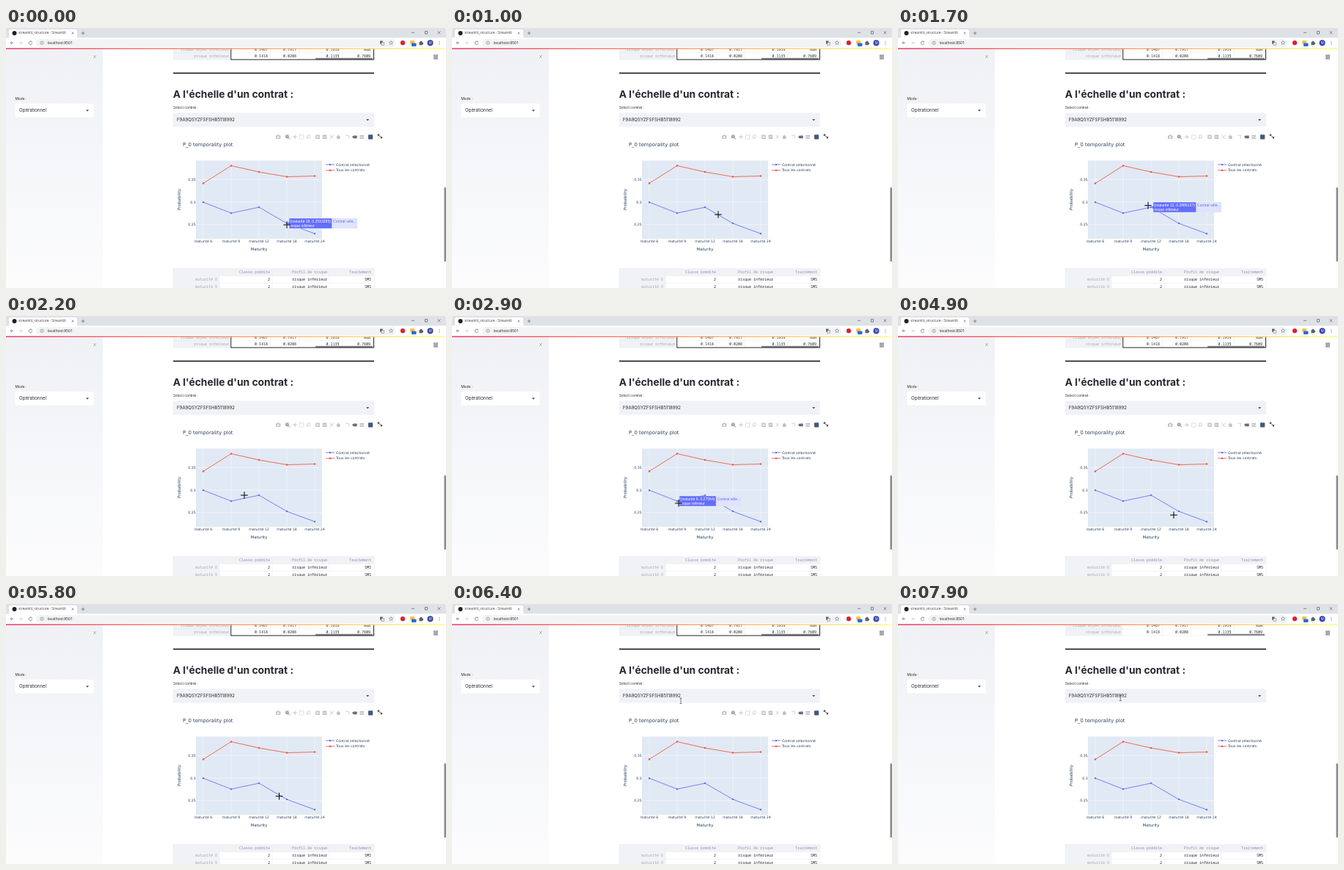
Write an HTML page that moves like this. It is 600x354 px and loops after 8000 ms.

```html
<!DOCTYPE html>
<html lang="fr">
<head>
<meta charset="utf-8">
<title>Streamlit</title>
<style>
html, body { margin: 0; width: 100%; height: 100%; overflow: hidden; background: #fff }
svg { display: block; width: 600px; height: 354px }
text { white-space: pre }
</style>
</head>
<body>
<svg id="stage" viewBox="0 0 600 354"></svg>
<script>
const UI = 'Inter, sans-serif', CHROME = 'Open Sans, sans-serif', PLOT = 'DejaVu Sans, sans-serif',
      MONO = 'Noto Sans Mono, monospace', ARIAL = 'Liberation Sans, sans-serif';
const INK = '#262730', PALE = '#f0f2f6', NAVY = '#2a3f5f', BLUE = '#636efa', RED = '#ef553b', GREY = '#a3a8b4';

const rect = (x, y, w, h, fill, more = '') => `<rect x="${x}" y="${y}" width="${w}" height="${h}" fill="${fill}" ${more}/>`;
const dot = (x, y, r, fill) => `<circle cx="${x}" cy="${y}" r="${r}" fill="${fill}"/>`;
const ring = (x, y, r, color, w) => `<circle cx="${x}" cy="${y}" r="${r}" fill="none" stroke="${color}" stroke-width="${w}"/>`;
const path = (d, color, w = .7, fill = 'none') => `<path d="${d}" fill="${fill}" stroke="${color}" stroke-width="${w}"/>`;
const hline = (x, y, w, color, width) => path(`M${x} ${y}h${w}`, color, width);
const vline = (x, y, h, color, width) => path(`M${x} ${y}v${h}`, color, width);
// y is the vertical middle of the text
const text = (x, y, s, size, font, fill = INK, anchor = 'start', more = '') =>
  `<text x="${x}" y="${y + size * .36}" font-size="${size}" font-family="${font}" fill="${fill}" text-anchor="${anchor}" ${more}>${s}</text>`;
const mono = (x, y, s, fill = INK) => text(x, y, s, 5, MONO, fill, 'end');
const cross = (x, y, r, color, w) => path(`M${x - r} ${y - r}l${2 * r} ${2 * r}m0 ${-2 * r}l${-2 * r} ${2 * r}`, color, w);
const plus = (x, y, r, color, w) => hline(x - r, y, 2 * r, color, w) + vline(x, y - r, 2 * r, color, w);
const caret = (x, y) => `<path d="M${x - 2} ${y - 1}h4l-2 2z" fill="${INK}"/>`;
const arrow = (x, y, dir, color) => path(`M${x - 2 * dir} ${y}h${4 * dir}m${-2 * dir} -2l${2 * dir} 2l${-2 * dir} 2`, color);

function browser() {
  const c = '#5f6368', y = 20.2;
  const star = [...Array(10).keys()].map(k => {
    const r = k % 2 ? 1.3 : 2.8, a = k * Math.PI / 5;
    return (525 + r * Math.sin(a)) + ' ' + (y - r * Math.cos(a));
  });
  return rect(0, 0, 600, 13.5, '#dee1e6') + rect(4, 2, 93, 14, '#fff', 'rx="2.5"') +
    dot(11.5, 7, 3, '#222') +
    text(17, 6.8, 'streamlit_structure - Streamlit', 4.7, CHROME, '#3c4043') +
    cross(91, 7, 1.4, c, .6) + plus(105, 7, 2.2, c, .7) +
    hline(553, 6.3, 4, '#222', .5) + path('M571.5 4.5h3v3.5h-3z', '#222', .5) + cross(590.5, 6.3, 1.9, '#222', .5) +
    rect(0, 13.5, 600, 14, '#fff') + rect(41, 15, 490, 11, '#f1f3f4', 'rx="5.5"') +
    arrow(8, y, -1, c) + arrow(20, y, 1, '#babcbe') +
    path('M35.6 19.2a2.3 2.3 0 1 0 0 2.2', c) + hline(34.4, 19, 1.6, c) +
    vline(49, 19.2, 2.2, c, .5) + ring(49, y, 2.2, c, .5) +
    text(56.5, y, 'localhost:8501', 5.1, CHROME, '#202124') +
    rect(510, 17.5, 3.6, 4, c) + rect(512, 19.4, 3.5, 3.8, '#f1f3f4', `stroke="${c}" stroke-width=".5"`) +
    path(`M${star.join('L')}z`, c, .5) +
    dot(541, y, 3.1, '#d9232e') +
    rect(551, 17, 6, 5, '#f4c63d', 'rx="1"') + rect(553, 20.5, 6.5, 4.5, '#2f68d8', 'rx="1"') +
    rect(563.5, 18.7, 4.6, 4.6, c) + dot(566, 18.5, 1.1, c) + dot(568.2, 21, 1.1, c) +
    dot(578.5, y, 4, '#3442a8') + text(578.5, y, 'M', 4.6, CHROME, '#fff', 'middle') +
    [-2, 0, 2].map(d => dot(591, y + d, .55, c)).join('') +
    rect(0, 27.3, 600, 1.5, 'url(#strip)');
}

function sidebar() {
  return rect(0, 28, 132, 326, 'url(#side)') + cross(121, 39, 2, GREY, .8) +
    text(12.5, 96.2, 'Mode :', 4.8, UI) + rect(12.5, 103, 107, 18.5, '#fff', 'rx="1.5"') +
    text(18, 112.3, 'Opérationnel', 6.1, UI) + caret(111, 112.5);
}

const row = (y, nameX, name, cols, vals, fill) => mono(nameX, y, name, GREY) +
  vals.split('|').map((v, i) => mono(cols[i], y, v, fill)).join('');

function tables() {
  const line = '#e6e8ec', upper = [357, 396, 454.5, 497], lower = [360, 438, 498];
  return rect(228, 27, 78.5, 16, PALE) +
    [33.7, 43.2, 327.5, 337.5, 347.3].map(y => hline(228, y, 274, line, .5)).join('') +
    [360.5, 399.5, 458].map(x => vline(x, 27, 16, line, .5)).join('') +
    row(28.8, 304, 'risque moyen inférieur', upper, '0.1467|0.7917|0.1959|NaN') +
    row(38.5, 304, 'risque inférieur', upper, '0.1418|0.0208|0.1135|0.7609') +
    rect(422, 40.8, 78, 2.2, '#858587', 'rx=".8"') +
    rect(228, 327.5, 274, 10, PALE) + rect(228, 337, 63, 17, PALE) +
    [228, 291, 363, 441, 502].map(x => vline(x, 327.5, 27, line, .5)).join('') +
    row(332.6, 288, '', lower, 'Classe prédite|Profil de risque|Traitement', '#8b909d') +
    row(342.4, 288, 'maturité 6', lower, '2|risque inférieur|SMS') +
    row(352, 288, 'maturité 9', lower, '2|risque inférieur|SMS');
}

function heading() {
  return rect(228, 60.7, 274, 1.5, '#111') +
    text(227.8, 89.6, "A l'échelle d'un contrat :", 13.8, UI, INK, 'start', 'font-weight="700"') +
    text(228, 108.7, 'Select contrat :', 4.75, UI) + rect(228, 115.5, 274, 19, PALE, 'rx="1.5"') +
    text(233, 125.2, 'F9A9QSYZFSFSHB5118992', 6.1, UI) + caret(493.2, 125.3) +
    [-2.3, 0, 2.3].map(d => hline(583, 39.5 + d, 6, INK, .9)).join('') +
    rect(597.5, 217, 2.5, 101, '#8a8b8f', 'rx="1"');
}

const months = [6, 9, 12, 18, 24], X = i => 269 + 38 * i;
const chosen = [237.2, 252, 244, 266, 280], all = [211.5, 187.5, 196, 202.5, 201.5];
const values = [.3, .27564, .2886137, .2533285, .23];

function chart() {
  const series = (ys, c) => path('M' + ys.map((y, i) => X(i) + ' ' + y).join('L'), c, .85) +
    ys.map((y, i) => dot(X(i), y, 1.2, c)).join('');
  const key = (y, c, s) => hline(436, y, 12, c, .85) + dot(442, y, 1.2, c) + text(450, y, s, 4.69, PLOT, NAVY);
  return text(241, 158.3, 'P_0 temporality plot', 6.8, PLOT, NAVY) +
    rect(259, 180.5, 172, 106.5, '#e1e9f4') +
    months.map((m, i) => vline(X(i), 180.5, 106.5, '#fff', .5) +
      text(X(i), 290.3, 'maturité ' + m, 4.69, PLOT, NAVY, 'middle')).join('') +
    [.35, .3, .25].map((v, i) => hline(259, 206.3 + 30.7 * i, 172, '#fff', .5) +
      text(258.8, 206.3 + 30.7 * i, v, 4.69, PLOT, NAVY, 'end')).join('') +
    series(chosen, BLUE) + series(all, RED) +
    key(186, BLUE, 'Contrat sélectionné') + key(193.8, RED, 'Tous les contrats') +
    text(345, 301, 'Maturity', 5.47, PLOT, NAVY, 'middle') +
    text(0, 0, 'Probability', 5.47, PLOT, NAVY, 'middle', 'transform="translate(236.5 233.5) rotate(-90)"');
}

function modebar() {
  const c = '#bfc1c5', d = '#6b6d72', y = 148.3;
  const box = x => rect(x - 2.8, y - 2.8, 5.6, 5.6, c, 'rx=".6"') + hline(x - 2, y, 4, '#fff', .8);
  return rect(368, 146.2, 6.5, 4.6, c, 'rx=".7"') + rect(370, 145.4, 2.4, 1.5, c) + dot(371.2, 148.5, 1.3, '#fff') +
    ring(383.4, 147.8, 2, d, .9) + path('M385 149.4l2 2', d, .9) + plus(383.4, 147.8, 1, d, .7) +
    plus(394, y, 2.8, c, .9) +
    rect(400.5, 145.7, 5.3, 5.3, 'none', `stroke="${c}" stroke-width=".7" stroke-dasharray="1.2 .5"`) +
    ring(412.5, 147.7, 2.2, c, .7) + path('M411 149.4l-1 2', c) +
    box(425) + vline(425, y - 2, 4, '#fff', .8) + box(434.5) + cross(444, y, 2.6, c, .8) +
    `<path d="M450.2 148.5l3.1-3 3.1 3h-.9v2.5h-4.4v-2.5z" fill="${c}"/>` +
    path('M463 146.2h4.5v4.5', c) +
    `<path d="M472 148.3l1.7-1.9h5v3.8h-5z" fill="${d}"/>` +
    rect(482.3, 145.9, 5.8, 2, c) + rect(482.3, 148.7, 5.8, 2, c) +
    rect(494, 145.2, 6.2, 6.2, '#43577f', 'rx=".6"') +
    path('M507.3 147v-2h2m-2 0l5.2 4.8m0-2v2h-2', INK, .9);
}

// pointer: [ms, x, y]
const trail = [[0, 383, 268], [200, 382, 273], [400, 382, 273], [700, 381, 272.5], [800, 381, 272.5],
  [1000, 363, 254], [1200, 350, 244], [1400, 344, 241], [1600, 344, 241], [1900, 335, 243],
  [2200, 325, 244], [2500, 310, 260], [2700, 309, 255], [3200, 309, 255], [3600, 309, 249],
  [3700, 309, 249], [3900, 318, 249], [4400, 345, 243], [4600, 358, 259], [4900, 376, 271],
  [5300, 377, 274.5], [5700, 377, 274.5], [5900, 368, 249], [6100, 333, 174], [6400, 312, 132],
  [6600, 309, 128], [6900, 308, 128], [7100, 303.5, 128], [7800, 303.5, 128], [8000, 303, 128]];

function pointerAt(t) {
  const i = trail.findIndex(k => k[0] > t), [a, ax, ay] = trail[i - 1], [b, bx, by] = trail[i];
  const p = (t - a) / (b - a);
  return [ax + (bx - ax) * p, ay + (by - ay) * p];
}

function pointer(x, y) {
  if (y > 180) return plus(x, y, 4.8, '#111', 1.1);
  if (y < 135) return vline(x, y - 3.6, 7.2, '#333', .6) + [-3.6, 3.6].map(d => hline(x - 1.5, y + d, 3, '#333', .6)).join('');
  return path(`M${x} ${y}v6.5l1.5-1.3 1 2.3 1-.4-1-2.3h2z`, '#111', .5, '#fff');
}

function tooltip(x, y) {
  const i = chosen.findIndex((py, n) => Math.hypot(X(n) - x, py - y) < 7.5);
  if (i < 0) return '';
  const s = `(maturité ${months[i]}, ${values[i]})`, px = X(i), py = chosen[i];
  const left = px + 3, w = 58.6 - 2.82 * (24 - s.length);
  return rect(left + w, py - 7, 34.5, 14, '#e0e4fb') +
    path(`M${px + .6} ${py}l2.4-2.4V${py - 7}h${w}v14h${-w}V${py + 2.4}z`, '#fff', .4, BLUE) +
    text(left + 1.3, py - 3.2, s, 5.08, ARIAL, '#fff') +
    text(left + 1.3, py + 3.2, 'risque inférieur', 5.08, ARIAL, '#fff') +
    text(left + w + 1.5, py - 3.2, 'Contrat séle...', 5.08, ARIAL, BLUE);
}

const stage = document.getElementById('stage');
stage.innerHTML = `<defs>
  <linearGradient id="strip"><stop stop-color="#f63366"/><stop offset="1" stop-color="#fffd80"/></linearGradient>
  <linearGradient id="side" x2="0" y2="1"><stop stop-color="#eff1f5"/><stop offset="1" stop-color="#fcfcfd"/></linearGradient>
  </defs>` + sidebar() + tables() +
  rect(306.8, 20, 194.7, 23, 'none', 'id="focus" stroke="#111" stroke-width=".9"') +
  heading() + chart() + `<g id="bar">${modebar()}</g><g id="live"></g>` + browser();
const [focusBox, bar, live] = ['focus', 'bar', 'live'].map(id => document.getElementById(id));

const start = performance.now();
function frame() {
  const t = Math.floor((performance.now() - start) % 8000 / 100) * 100;
  const [x, y] = pointerAt(t);
  focusBox.setAttribute('opacity', t < 7700 ? 1 : 0);
  bar.setAttribute('opacity', Math.max(0, Math.min(1, (6700 - t) / 300)));
  live.innerHTML = tooltip(x, y) + pointer(x, y);
  requestAnimationFrame(frame);
}
frame();
</script>
</body>
</html>
```
